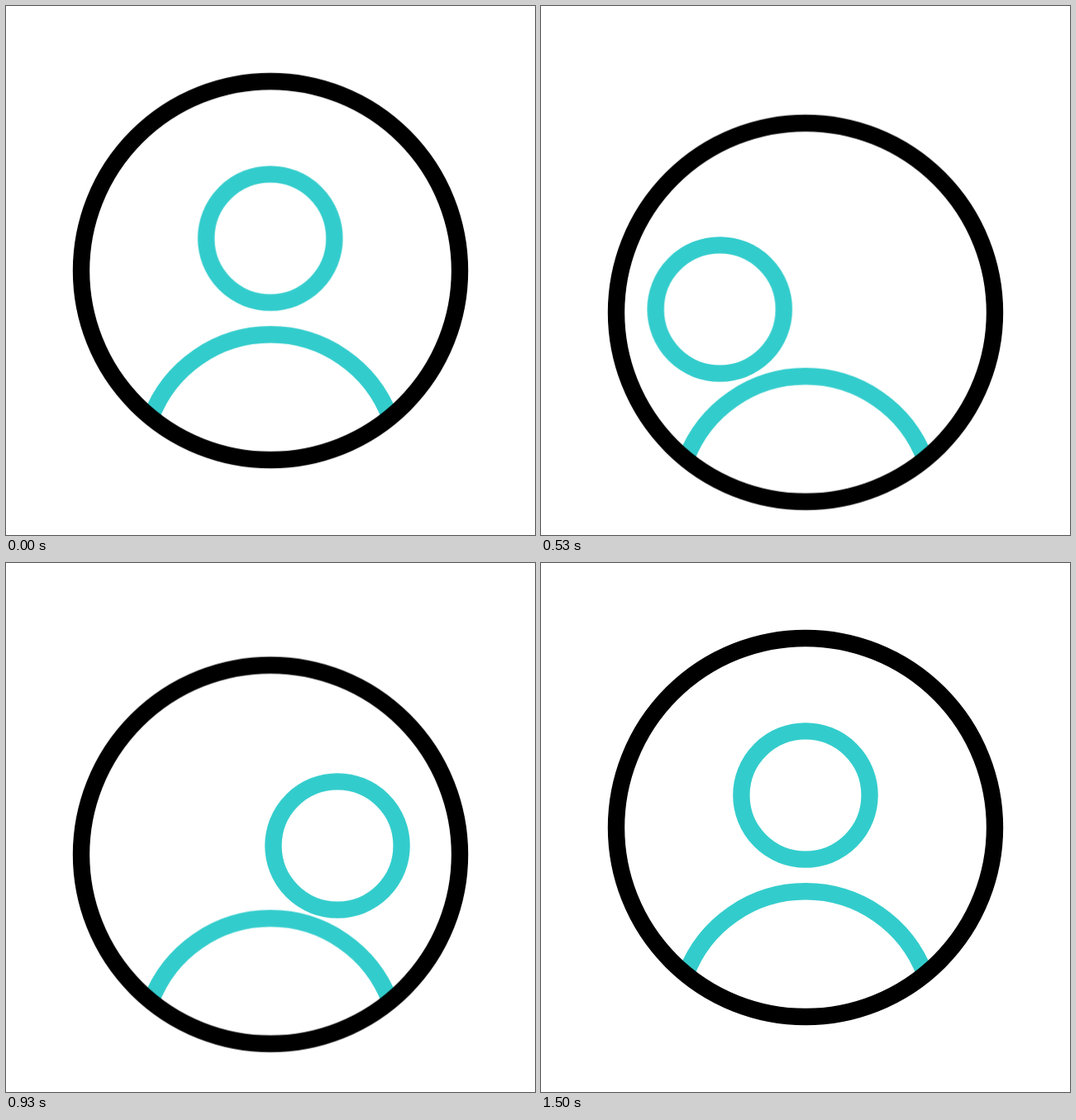
An HTML page that plays this animation: 640x640 px, repeating every 2 s.

```html
<!DOCTYPE html>
<html lang="en">
<head>
<meta charset="utf-8">
<title>Profile icon</title>
<style>
  html, body { margin: 0; height: 100%; overflow: hidden; background: #fff; }
  svg { display: block; width: 100vw; height: 100vh; }
  svg * { fill: none; stroke-width: 20.4; }
  .teal { stroke: #3cc; }
  .ring { stroke: #000; }

  .badge, .sway, .dip { animation: 2s infinite; }
  .badge { animation-name: bob; }
  .sway { animation-name: sway; }
  .dip { animation-name: dip; }

  /* whole badge sinks and rises */
  @keyframes bob {
    0% { transform: translateY(0); animation-timing-function: cubic-bezier(.3, 0, .69, 1); }
    33% { transform: translateY(56.6px); animation-timing-function: cubic-bezier(.275, 0, .724, 1); }
    63.5%, 100% { transform: translateY(0); }
  }

  /* head rolls left, right, back */
  @keyframes sway {
    0% { transform: translateX(0); animation-timing-function: cubic-bezier(.333, 0, .667, 1); }
    27.5% { transform: translateX(-104.1px); animation-timing-function: cubic-bezier(.38, 0, .684, 1); }
    50% { transform: translateX(95px); animation-timing-function: cubic-bezier(.333, 0, .667, 1); }
    75%, 100% { transform: translateX(0); }
  }

  /* head drops towards the shoulders */
  @keyframes dip {
    0% { transform: translateY(0); animation-timing-function: cubic-bezier(.48, 0, .7, 1); }
    27.5% { transform: translateY(35.4px); animation-timing-function: cubic-bezier(.333, 0, .667, 1); }
    35.5% { transform: translateY(37.1px); animation-timing-function: cubic-bezier(.5, 0, .713, 1); }
    50% { transform: translateY(26.2px); animation-timing-function: cubic-bezier(.289, 0, .576, 1); }
    75%, 100% { transform: translateY(0); }
  }
</style>
</head>
<body>
<svg viewBox="0 0 640 640">
  <g class="badge">
    <path class="teal" d="M175.4 497.4A154.5 154.5 0 0 1 464.6 497.4"/>
    <g class="sway">
      <g class="dip">
        <circle class="teal" cx="320" cy="281" r="77.6"/>
      </g>
    </g>
    <circle class="ring" cx="320" cy="320" r="229"/>
  </g>
</svg>
</body>
</html>
```
